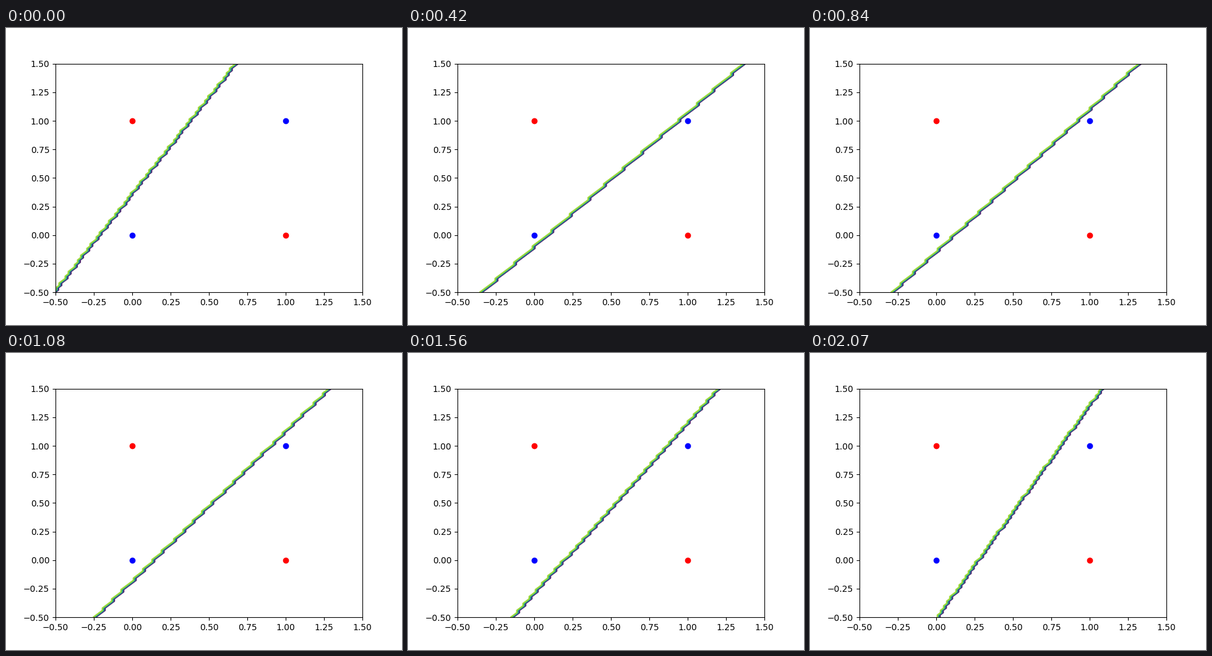
A matplotlib script for the animation above (2.1 s loop, 640 by 480 pixels).

```python
import numpy as np
import matplotlib.pyplot as plt
from matplotlib.animation import FuncAnimation

FRAMES, INTERVAL = 70, 30
RATE = 1.0
START = np.array([-0.6908, 0.4092, -0.1475])  # w1, w2, bias

# XOR samples; the last column feeds the bias
X = np.array([[0, 0, 1], [0, 1, 1], [1, 0, 1], [1, 1, 1]], float)
Y = np.array([0, 1, 1, 0], float)


def sigmoid(z):
    return 1 / (1 + np.exp(-z))


def train(w, steps):
    """Weights before each step of batch gradient descent."""
    history = []
    for _ in range(steps):
        history.append(w)
        w = w - RATE * X.T @ (sigmoid(X @ w) - Y) / len(Y)
    return history


weights = train(START, FRAMES)
axis = np.linspace(-0.5, 1.5, 100)
gx, gy = np.meshgrid(axis, axis)

fig, ax = plt.subplots(figsize=(6.4, 4.8), dpi=100)
ax.set_xlim(-0.5, 1.5)
ax.set_ylim(-0.5, 1.5)
for label, color in ((1, "red"), (0, "blue")):
    pts = X[Y == label]
    ax.plot(pts[:, 0], pts[:, 1], "o", color=color, zorder=2.2)

boundary = None


def update(i):
    global boundary
    if boundary is not None:
        boundary.remove()
    w1, w2, b = weights[i]
    predicted = (w1 * gx + w2 * gy + b > 0).astype(float)
    boundary = ax.contour(gx, gy, predicted, cmap="viridis")
    return [boundary]


anim = FuncAnimation(fig, update, frames=FRAMES, interval=INTERVAL,
                     repeat=True, repeat_delay=0, blit=False)
plt.show()
```
